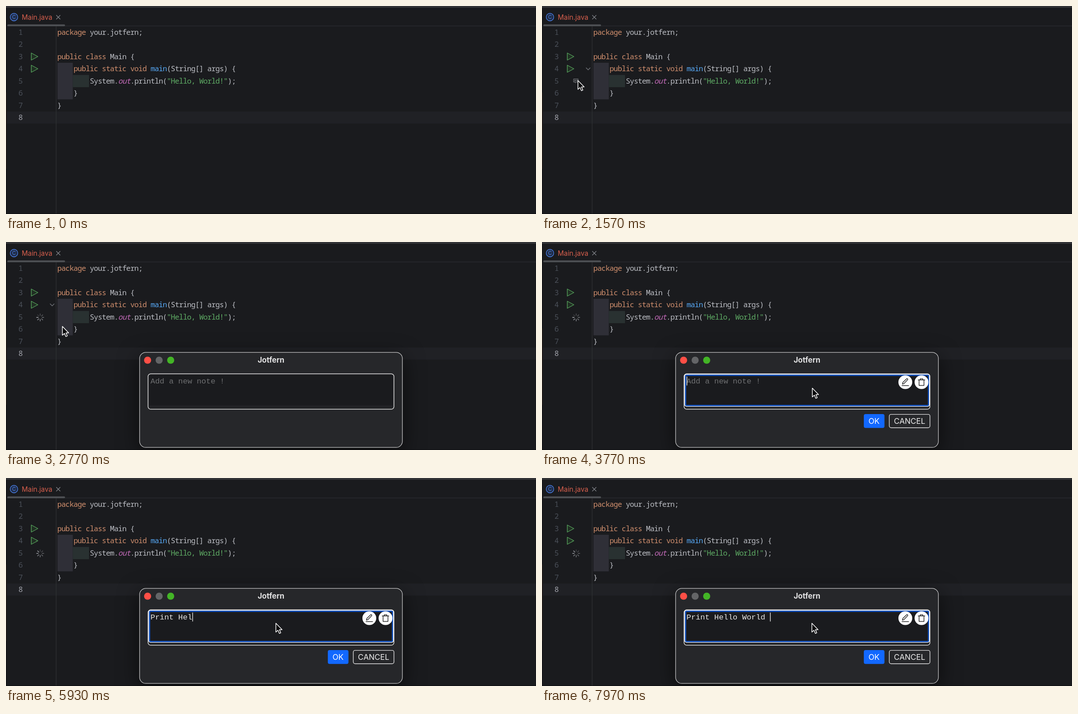
Recreate the animation shown at these times as an HTML page. Size 1194 by 469 pixels, loop 8000 ms.

```html
<!DOCTYPE html>
<html lang="en">
<head>
<meta charset="utf-8">
<title>Editor note</title>
<style>
  html, body { margin: 0; width: 100%; height: 100%; overflow: hidden; background: #1a1b1e; }
  svg { display: block; width: 1194px; height: 469px; }
  text { white-space: pre; font-family: Inter, sans-serif; }
  .code text { font: 500 16.7px "Noto Sans Mono", monospace; letter-spacing: -.88px; fill: #bcbec4; }
  .code .num { fill: #4b5059; font-weight: 400; }
  .code .current { fill: #a1a3ab; }
  .key { fill: #cf8e6d; }
  .fn { fill: #56a8f5; }
  .str { fill: #5fad65; }
  .field { fill: #c56bba; font-style: italic; }
  .note { font: 17.4px "Liberation Mono", monospace; }
  .line { fill: none; stroke-linecap: round; stroke-linejoin: round; }
  #window { filter: drop-shadow(0 12px 24px rgba(0, 0, 0, .6)); }
</style>
</head>
<body>
<svg viewBox="0 0 1194 469">
  <rect width="1194" height="469" fill="#1a1b1e"/>
  <rect width="1194" height="4" fill="#333437"/>
  <rect y="4" width="1.5" height="465" fill="#121315"/>
  <rect y="195" width="1" height="172" fill="#2b1d18"/>
  <rect y="467.5" width="1194" height="1.5" fill="#111214"/>
  <rect x="2" y="238" width="1192" height="27" fill="#202125"/>
  <path d="M2 45H1194M113 45V468" stroke="#313236" stroke-width="1.2"/>
  <rect x="3" y="41.5" width="130" height="4" rx="2" fill="#4e5155"/>

  <circle cx="18" cy="25" r="8.5" fill="#202c45" stroke="#4b82ee" stroke-width="1.3"/>
  <text x="18" y="29.2" font-size="11.5" fill="#4b82ee" text-anchor="middle">C</text>
  <text x="35.5" y="31.2" font-size="15.3" fill="#d75f4d">Main.java</text>
  <path class="line" d="M113.5 21l8.5 8.5M122 21l-8.5 8.5" stroke="#878a90" stroke-width="1.2"/>

  <rect x="116" y="128" width="34.5" height="82.5" fill="#2f2f37"/>
  <rect x="150.5" y="155.5" width="36.5" height="27.5" fill="#293131"/>
  <g class="line" stroke="#57a35c" stroke-width="1.4" style="fill:#202e23">
    <path d="M57 106l14.8 8-14.8 8z"/>
    <path d="M57 133.5l14.8 8-14.8 8z"/>
  </g>
  <g class="code" id="code"></g>

  <path id="fold" class="line" d="M99.5 139.5l4.5 4.5 4.5-4.5" stroke="#777a80" stroke-width="1.3"/>
  <g id="noteIcon" class="line" stroke="#85878c">
    <path d="M71.5 164.5h10v7h-4l-2.5 2v-2h-3.5z"/>
    <path d="M73 169.5l1.2-3 1.2 3M77 166.5v3M79.5 166.5v3"/>
  </g>
  <g id="spinner" class="line" stroke="#8b8d92" stroke-width="1.9"></g>

  <g id="dialog">
    <rect id="window" x="301" y="248.8" width="592" height="214.4" rx="14" fill="#26272a" stroke="#c9c9ca" stroke-width="1.3"/>
    <circle cx="319" cy="266.5" r="8" fill="#ff4f46"/>
    <circle cx="345" cy="266.5" r="8" fill="#646567"/>
    <circle cx="371" cy="266.5" r="8" fill="#43b526"/>
    <text x="597" y="271.8" font-size="17" font-weight="700" fill="#e2e2e3" text-anchor="middle">Jotfern</text>
    <rect x="320" y="297.2" width="554" height="79.8" rx="6" fill="#222326" stroke="#dedede" stroke-width="1.5"/>
    <rect x="323" y="300" width="548" height="68.5" fill="#1a1b1e"/>
    <g id="focusRing" fill="none">
      <rect x="321.5" y="298.3" width="551.5" height="72" rx="4" stroke="#f4f6fa" stroke-width="2"/>
      <rect x="323.6" y="300.6" width="547" height="68" rx="2" stroke="#0f50c0" stroke-width="2.6"/>
    </g>
    <text id="note" class="note" x="325.5" y="319.2"></text>
    <rect id="caret" y="303.5" width="1.4" height="20" fill="#eee"/>
    <g id="tools">
      <circle cx="818.5" cy="316" r="15.6" fill="#fff"/>
      <circle cx="855" cy="316" r="15.6" fill="#fff"/>
      <g class="line" stroke="#222" stroke-width="1.5">
        <path d="M812 320.5l.8-3.7 8.5-8.3q1.2-1 2.3.1 1 1.1 0 2.2l-8.4 8.6zM811 323.7h15"/>
        <path d="M847.5 311h15M852 311v-2.5h6v2.5M849.5 311v12.5h11v-12.5"/>
      </g>
    </g>
    <g id="buttons" font-size="17.4" text-anchor="middle">
      <rect x="725" y="388" width="46.5" height="31.3" rx="4" fill="#1268ff"/>
      <rect x="782.4" y="388.6" width="91.6" height="30.2" rx="4" fill="none" stroke="#e4e4e5" stroke-width="1.4"/>
      <text x="748" y="410.2" fill="#fff">OK</text>
      <text x="828" y="410.2" fill="#eee">CANCEL</text>
    </g>
  </g>
  <path id="pointer" d="M0 0V20L4.6 15.8 7.8 23 11 21.6 8 14.6H14Z" fill="#08080a" stroke="#fff" stroke-width="1.5" stroke-linejoin="round"/>
</svg>
<script>
const $ = id => document.getElementById(id);
const span = (cls, text) => `<tspan class="${cls}">${text}</tspan>`;
const key = text => span('key', text);

const lines = [
  key('package') + ' your.jotfern;',
  '',
  key('public class') + ' Main {',
  '    ' + key('public static void ') + span('fn', 'main') + '(String[] args) {',
  '        System.' + span('field', 'out') + '.println(' + span('str', '"Hello, World!"') + ');',
  '    }',
  '}',
  ''
];
$('code').innerHTML = lines.map((line, i) => {
  const y = 65 + i * 27.45;
  return `<text class="num ${i === 7 ? 'current' : ''}" x="28" y="${y}">${i + 1}</text>
    <text x="115.6" y="${y}">${line}</text>`;
}).join('');

$('spinner').innerHTML = Array.from({ length: 8 }, (_, i) =>
  `<path d="M0-4.5V-8" transform="translate(77 170) rotate(${i * 45})"/>`).join('');

// Pointer strokes: start, end, from x y, to x y, downward bend
const moves = [
  [930, 1480, 230, 475, 81, 168, 0],
  [2600, 3540, 81, 168, 609, 329.5, 103],
  [4000, 4200, 609, 329.5, 608, 327.5, 0]
];
const FIRST_KEY = 4600, KEY_GAP = 150, FIX_KEY = 7060, FIX_GAP = 130, FOCUS = 3380;
const DRAFT = 'Print Hello w', FINAL = 'Print Hello World ';

function pointerAt(t) {
  const [t0, t1, x0, y0, x1, y1, bend] = moves.filter(m => t >= m[0]).pop() || moves[0];
  const u = Math.min(1, Math.max(0, (t - t0) / (t1 - t0)));
  const s = u * u * (3 - 2 * u);
  return [x0 + (x1 - x0) * s, y0 + (y1 - y0) * s + bend * s * (1 - s)];
}

// Typed text and the time of the last key, which restarts the caret blink
function typingAt(t) {
  if (t < FIRST_KEY) return ['', FOCUS];
  if (t < FIX_KEY) {
    const n = Math.min(DRAFT.length, 1 + Math.floor((t - FIRST_KEY) / KEY_GAP));
    return [DRAFT.slice(0, n), FIRST_KEY + (n - 1) * KEY_GAP];
  }
  const n = Math.min(6, Math.floor((t - FIX_KEY) / FIX_GAP));
  return [FINAL.slice(0, 12 + n), FIX_KEY + n * FIX_GAP];
}

const show = (id, on) => { $(id).style.display = on ? '' : 'none'; };

function draw() {
  const t = performance.now() % 8000;
  const [x, y] = pointerAt(t);
  show('pointer', t >= 930);
  $('pointer').setAttribute('transform', `translate(${x} ${y})`);
  show('fold', t >= 1250 && t < 3080);
  show('noteIcon', t >= 1350 && t < 1900);
  show('spinner', t >= 1900);
  const step = Math.floor(t / 125);
  [...$('spinner').children].forEach((spoke, i) => {
    spoke.style.opacity = 1 - ((step - i + 8) % 8) * 0.1;
  });

  show('dialog', t >= 2150);
  show('tools', t >= 3270);
  show('focusRing', t >= FOCUS);
  show('buttons', t >= 3450);

  const [text, lastKey] = typingAt(t);
  $('note').textContent = text || 'Add a new note !';
  $('note').style.fill = text ? '#e8e8e8' : '#6f7072';
  $('caret').setAttribute('x', 325.8 + text.length * 10.44);
  show('caret', t >= FOCUS && (t - lastKey) % 1000 < 500);
  requestAnimationFrame(draw);
}
draw();
</script>
</body>
</html>
```
